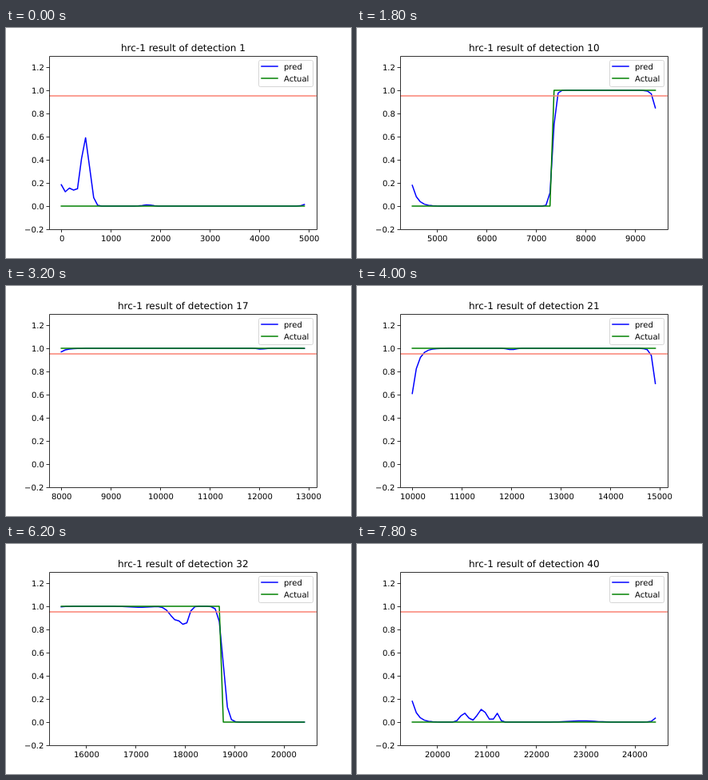
An HTML page with a canvas for the animation above (8 s loop, 432x288 px).

```html
<!DOCTYPE html>
<html lang="en">
<head>
<meta charset="utf-8">
<title>Detection result</title>
<style>
  html, body { margin: 0; width: 100%; height: 100%; overflow: hidden; background: #fff; }
  canvas { display: block; }
</style>
</head>
<body>
<canvas id="chart" width="432" height="288"></canvas>
<script>
const ctx = document.getElementById('chart').getContext('2d');

const WINDOWS = 40, WINDOW_MS = 200, HOP = 500;
const STEP = 81.92, LAST = 60;               // sample spacing and last sample index
const LEFT = 54, RIGHT = 388.8, TOP = 34.56, BOTTOM = 252;
const PAD = (RIGHT - LEFT) / 22;             // 5 % data margin
const X_SCALE = (RIGHT - LEFT - 2 * PAD) / (STEP * LAST);
const Y_SCALE = (BOTTOM - TOP) / 1.5;
const RISE = 89, FALL = 229;                 // samples where the label switches

// Humps and dips of the prediction around its level.
const bumps = [
  { at: 2.4, width: 1.4, height: .14 },
  { at: 5.9, width: 1.45, height: .6 },
  { at: 21.3, width: 1.5, height: .012 },
  { at: 146.5, width: 1.2, height: -.012 },
  { at: 208.5, width: 3.5, height: -.008 },
  { at: 217.5, width: 2.2, height: -.13 },
  { at: 219.7, width: 1.1, height: -.13 },
  { at: 250.8, width: 1.3, height: .08 },
  { at: 255.2, width: 1.5, height: .115 },
  { at: 258.9, width: .8, height: .08 },
  { at: 280, width: 4.5, height: .014 }
];

const logistic = v => 1 / (1 + Math.exp(-v));
const actualAt = s => s >= RISE && s < FALL ? 1 : 0;
const levelAt = s => logistic(2.9 * (s - RISE + .3)) * logistic(1.9 * (FALL - s));
const bumpsAt = s => bumps.reduce((sum, { at, width, height }) =>
  sum + height * Math.exp(-(((s - at) / width) ** 2)), 0);

// Both ends of a window lack context and are pulled towards one half.
function predictions(n, first) {
  const drift = (.93 * n + .25) % 1;
  const head = actualAt(first) ? drift : .36;
  const tail = actualAt(first + LAST) ? drift ** 2 : .15 * drift;
  return Array.from({ length: LAST + 1 }, (_, i) => {
    const s = first + i, context = 1 - Math.exp((i - LAST) / 12);
    const value = levelAt(s) + context * bumpsAt(s);
    return value + (.5 - value) * (head * .45 ** i + tail * .2 ** (LAST - i));
  });
}

const yOf = v => BOTTOM - (v + .2) * Y_SCALE;
const snap = v => Math.floor(v + .5) + .5;

function line(points, color, width = 1.5, cap = 'square') {
  ctx.beginPath();
  points.forEach(([x, y]) => ctx.lineTo(x, y));
  ctx.strokeStyle = color;
  ctx.lineWidth = width;
  ctx.lineCap = cap;
  ctx.stroke();
}

// Text starts on a whole pixel; align is the share of its width left of x.
function text(string, x, y, align = 0, size = 10) {
  ctx.font = `${size}px "DejaVu Sans", sans-serif`;
  ctx.textRendering = 'geometricPrecision';
  ctx.fillStyle = '#000';
  ctx.fillText(string, Math.ceil(x - align * ctx.measureText(string).width), y);
}

function drawAxes(x0) {
  ctx.strokeStyle = '#000';
  ctx.lineWidth = .8;
  ctx.strokeRect(snap(LEFT), snap(TOP), snap(RIGHT) - snap(LEFT), snap(BOTTOM) - snap(TOP));
  for (let i = -1; i <= 6; i++) {
    const y = yOf(i / 5);
    line([[50.5, snap(y)], [54.5, snap(y)]], '#000', .8, 'butt');
    text((i / 5).toFixed(1).replace('-', '\u2212'), 47, Math.round(y + 3.8), 1);
  }
  for (let v = Math.ceil(x0 / 1000) * 1000; v <= x0 + 5160; v += 1000) {
    const x = LEFT + PAD + (v - x0) * X_SCALE;
    line([[snap(x), 252.5], [snap(x), 256]], '#000', .8, 'butt');
    text(String(v), x, 267, .5);
  }
}

function drawLegend() {
  ctx.beginPath();
  ctx.roundRect(316.5, 40.5, 68, 33, 2);
  ctx.fillStyle = 'rgba(255,255,255,.8)';
  ctx.fill();
  ctx.strokeStyle = 'rgba(204,204,204,.8)';
  ctx.lineWidth = 1;
  ctx.stroke();
  [['pred', '#00f', 48], ['Actual', '#008000', 63]].forEach(([name, color, y]) => {
    line([[320, y], [340, y]], color);
    text(name, 348, y + 4);
  });
}

function draw(n) {
  const x0 = (n - 1) * HOP, first = Math.floor(x0 / STEP);
  const predicted = predictions(n, first);
  const actual = predicted.map((_, i) => actualAt(first + i));
  const plot = values => values.map((v, i) => [LEFT + PAD + i * STEP * X_SCALE, yOf(v)]);

  ctx.fillStyle = '#fff';
  ctx.fillRect(0, 0, 432, 288);
  ctx.lineJoin = 'round';
  line(plot(predicted), '#00f');
  line(plot(actual), '#008000');
  line([[LEFT, 85], [RIGHT, 85]], 'salmon', 1.5, 'butt');
  drawAxes(x0);
  text(`hrc-1 result of detection ${n}`, 221.4, 29, .5, 12);
  drawLegend();
}

let shown = 0;
function tick() {
  const n = Math.floor(performance.now() / WINDOW_MS) % WINDOWS + 1;
  if (n !== shown) draw(shown = n);
  requestAnimationFrame(tick);
}
tick();
</script>
</body>
</html>
```
